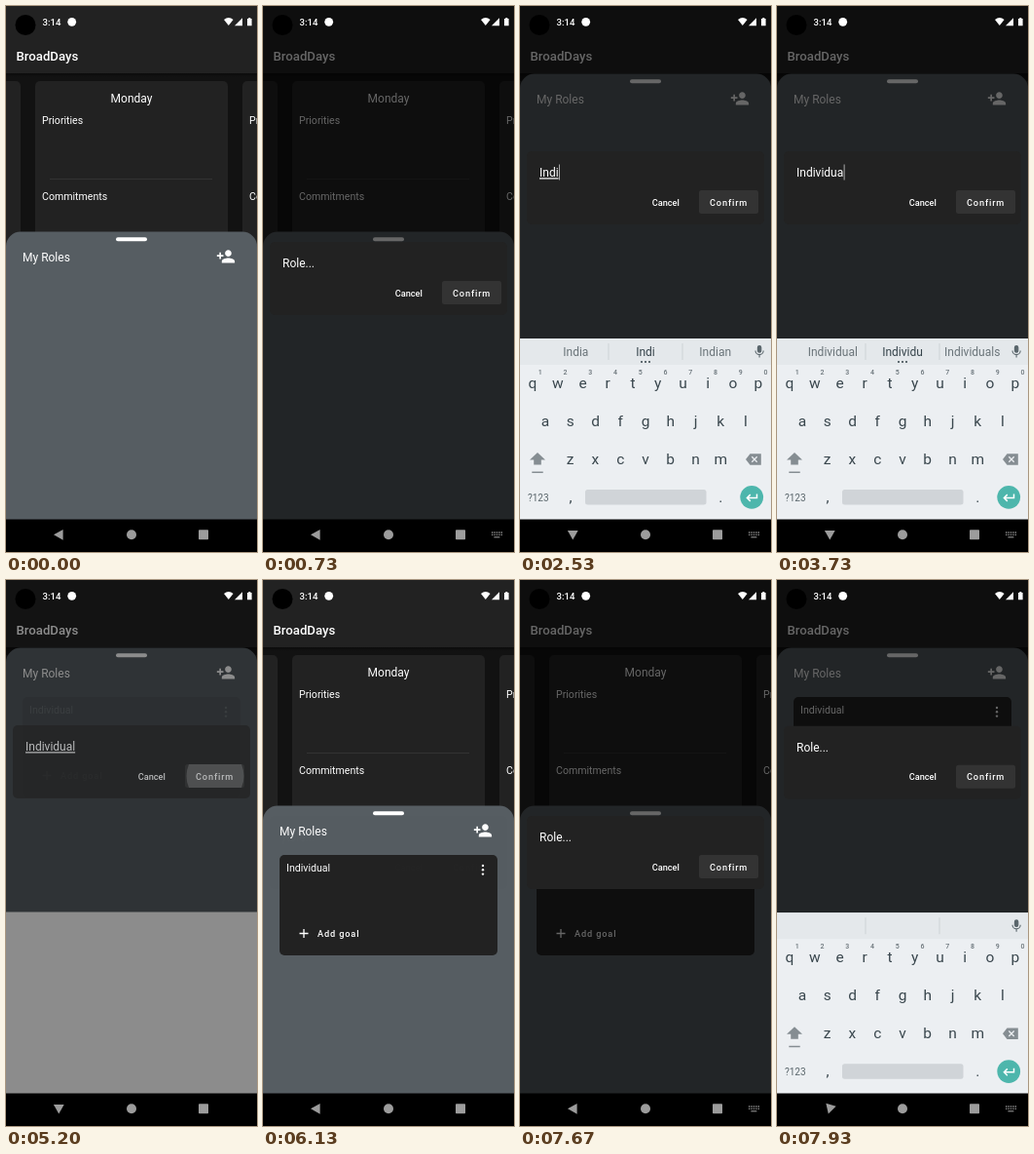
An HTML page for the animation above (8000 ms loop, 258 by 560 pixels).

```html
<!DOCTYPE html>
<html lang="en">
<head>
<meta charset="utf-8">
<title>Weekly planner</title>
<style>
html, body { margin: 0; width: 100%; height: 100%; overflow: hidden; background: #000; }
svg { display: block; width: 100%; height: 100%; }
text { font-family: Roboto, "Noto Sans", sans-serif; fill: #fff; white-space: pre; }
.title { font-size: 13.2px; font-weight: 500; }
.head { font-size: 12px; }
.body { font-size: 10.6px; }
.btn { font-size: 9.2px; font-weight: 500; letter-spacing: .85px; }
.mid { text-anchor: middle; }
.key { font-size: 15.5px; fill: #3a474e; }
.hint { font-size: 7px; font-weight: 500; fill: #687278; }
.sug { font-size: 12px; fill: #6a7479; }
</style>
</head>
<body>
<svg viewBox="0 0 258 560">
  <defs>
    <clipPath id="btnClip"><rect x="184" y="282" width="61" height="24" rx="2.5"/></clipPath>
    <linearGradient id="shade" x2="0" y2="1">
      <stop stop-color="#000" stop-opacity=".35"/><stop offset="1" stop-color="#000" stop-opacity="0"/>
    </linearGradient>
  </defs>

  <rect width="258" height="560" fill="#121212"/>
  <rect width="258" height="69" fill="#222"/>
  <rect y="69" width="258" height="4" fill="url(#shade)"/>
  <text class="title" x="10.5" y="56">BroadDays</text>
  <g fill="#222">
    <rect x="-20" y="77" width="35" height="300" rx="5"/>
    <rect x="30" y="77" width="198" height="300" rx="5"/>
    <rect x="243" y="77" width="40" height="300" rx="5"/>
  </g>
  <text class="head mid" x="129" y="99">Monday</text>
  <text class="body" x="37" y="120.5">Priorities</text>
  <text class="body" x="37" y="198.5">Commitments</text>
  <text class="body" x="250" y="120.5">Priorities</text>
  <text class="body" x="250" y="198.5">Commitments</text>
  <rect x="45" y="177" width="167" height="1" fill="#333"/>

  <g id="sheet">
    <rect y="231.5" width="258" height="520" rx="15" fill="#565d62"/>
    <rect x="113" y="237.2" width="32" height="4" rx="2" fill="#fff"/>
    <text class="head" x="17" y="261.5">My Roles</text>
    <path transform="translate(216 247) scale(.83)" fill="#fff" d="M15 12c2.2 0 4-1.8 4-4s-1.8-4-4-4-4 1.8-4 4 1.8 4 4 4zM6 10V7H4v3H1v2h3v3h2v-3h3v-2zM15 14c-2.7 0-8 1.3-8 4v2h16v-2c0-2.7-5.3-4-8-4z"/>
    <g id="card">
      <rect x="17" y="282" width="224" height="103" rx="5" fill="#222"/>
      <text class="body" x="24" y="299">Individual</text>
      <g fill="#fff">
        <circle cx="226" cy="293" r="1.2"/><circle cx="226" cy="297.3" r="1.2"/><circle cx="226" cy="301.6" r="1.2"/>
      </g>
      <path d="M37.5 362.5h9M42 358v9" stroke="#fff" stroke-width="1.3"/>
      <text class="btn" x="56" y="366">Add goal</text>
    </g>
  </g>
  <rect id="gap" y="340.5" width="258" height="187" fill="#fff"/>
  <rect id="dim" width="258" height="560"/>

  <g id="dialog">
    <rect x="7" y="242" width="244" height="75" rx="5" fill="#222"/>
    <text id="field" class="head" x="20" y="268.3"></text>
    <rect id="caret" y="255.5" width="1" height="16" fill="#aaa"/>
    <text class="btn" x="135.7" y="297.5" style="letter-spacing:0">Cancel</text>
    <rect x="184" y="282" width="61" height="24" rx="2.5" fill="#333"/>
    <circle id="ripple" cx="215" cy="294" fill="#fff" opacity=".22" clip-path="url(#btnClip)"/>
    <text class="btn" x="195" y="297.5">Confirm</text>
  </g>

  <circle cx="20" cy="19.5" r="10.5"/>
  <text x="37.5" y="19.8" style="font-size:9.6px;font-weight:500">3:14</text>
  <g fill="#fff">
    <circle cx="67.7" cy="16.3" r="4.4"/>
    <path d="M224 14q4.8-3.8 9.6 0l-4.8 6zM235 20.2l8-8v8z"/>
    <path d="M248 13h1.3v-1h2v1h1.3v7.3H248z"/>
  </g>

  <g id="keyboard">
    <rect y="341" width="258" height="187" fill="#eceff2"/>
    <rect y="341" width="258" height="27" fill="#e4e8eb"/>
    <path d="M91 346v17M167 346v17" stroke="#cdd2d6"/>
    <g id="sugs">
      <text class="sug mid" x="57.3" y="358.6"></text>
      <text class="sug mid" x="129" y="358.6" style="fill:#36444b"></text>
      <text class="sug mid" x="200.7" y="358.6"></text>
    </g>
    <path id="dots" d="M125 365h.01M129 365h.01M133 365h.01" stroke="#36444b" stroke-width="2" stroke-linecap="round"/>
    <g fill="none" stroke="#59656b" stroke-width="1.1">
      <rect x="244.4" y="348.6" width="3.4" height="6.6" rx="1.7" fill="#59656b"/>
      <path d="M242 353.5a4.1 4.1 0 0 0 8.2 0M246.1 357.6v2.8"/>
    </g>
    <g id="keys"></g>
    <path d="M18 458l8 7.6h-4.2v4.9h-7.6v-4.9H10zM12.3 477.5h11.4v1.5H12.3z" fill="#858d92"/>
    <path d="M236.5 459.3h11.3v11.4h-11.3l-4.5-5.7z" fill="#858d92"/>
    <path d="M238.3 462.3l5.4 5.4m0-5.4l-5.4 5.4" stroke="#eceff2" stroke-width="1.3"/>
    <text x="8" y="507.6" style="font-size:10px;fill:#59656b">?123</text>
    <text class="key mid" x="52" y="508.5">,</text>
    <text class="key mid" x="206.3" y="508.5">.</text>
    <rect x="67" y="496" width="124.5" height="15.5" rx="2.5" fill="#d0d4d8"/>
    <circle cx="238.2" cy="503.8" r="11.9" fill="#4db6ac"/>
    <path d="M243.5 500.5v4h-10m3.3-3.4l-3.4 3.4 3.4 3.4" fill="none" stroke="#fff" stroke-width="1.5"/>
  </g>

  <rect y="526.5" width="258" height="34"/>
  <g fill="#9c9c9c">
    <path id="back" d="M49 542.3l9.6-5.4v10.8z"/>
    <circle cx="129" cy="542.3" r="5"/>
    <rect x="198" y="537.3" width="10" height="10" rx=".8"/>
  </g>
  <g id="imeIcon" stroke="#8c8c8c" fill="none">
    <path d="M235 540h11M235 542.3h11" stroke-width="1.3" stroke-dasharray="1.4 1"/>
    <path d="M237.4 544.8h6" stroke-width="1.2"/>
  </g>
</svg>
<script>
const $ = id => document.getElementById(id);
const LOOP = 8000, FPS = 15;
const WORD = 'Individual';
const KEY_TIMES = [1600, 1800, 2000, 2200, 2667, 3067, 3267, 3467, 3733, 3933];
const GUESSES = [['', ''], ["I'm", "I'll"], ['In', 'Inc'], ['India', 'Indeed'], ['India', 'Indian'],
  ['Individual', 'Individuals']];
const IME_LAG = 120;

// Keyboard letters
const STEP = 25.75;
const label = (cls, x, y, s) => `<text class="${cls} mid" x="${x}" y="${y}">${s}</text>`;
$('keys').innerHTML = [['qwertyuiop', 13], ['asdfghjkl', 26], ['zxcvbnm', 51.7]].map(([row, x0], r) =>
  [...row].map((c, i) => label('key', x0 + i * STEP, 392 + r * 39, c) +
    (r ? '' : label('hint', 20.7 + i * STEP, 378, (i + 1) % 10))).join('')).join('');

const span = (t, a, b) => Math.min(1, Math.max(0, (t - a) / (b - a)));
const out = p => 1 - (1 - p) ** 3;
const show = (id, on) => $(id).setAttribute('visibility', on ? 'visible' : 'hidden');
const shift = (id, y) => $(id).setAttribute('transform', `translate(0 ${y})`);
const alpha = (id, a) => $(id).setAttribute('opacity', a);

function drawField(t, second) {
  const typed = second ? 0 : KEY_TIMES.filter(k => t >= k - 5).length;
  const known = second ? 0 : KEY_TIMES.filter(k => t >= k + IME_LAG).length;
  const field = $('field');
  field.textContent = typed ? WORD.slice(0, typed) : 'Role...';
  field.style.textDecoration = typed && known === typed ? 'underline' : 'none';
  $('caret').setAttribute('x', 20.4 + (typed ? field.getComputedTextLength() : 0));

  const since = typed ? t - KEY_TIMES[typed - 1] + 5 : t - (second ? 6150 : 20);
  show('caret', since % 1000 < 500 && !(t > 5100 && t < 6000));

  const [left, right] = known === WORD.length ? ['Individually', 'Individuals']
    : GUESSES[Math.min(known, GUESSES.length - 1)];
  [left, WORD.slice(0, known), right].forEach((s, i) => $('sugs').children[i].textContent = s);
}

function render(t) {
  const second = t > 6000;
  const open = second ? 6133 : 0;
  const ime = second ? 7667 : 734;
  const closing = !second && t > 5130;

  const fadeIn = span(t, open, open + 133);
  const gone = second ? 0 : span(t, 5133, 5400);
  alpha('dim', .6 * fadeIn * (1 - gone));
  alpha('dialog', fadeIn * (second ? 1 : 1 - span(t, 5133, 5333)));
  shift('dialog', -93 * out(span(t, ime, ime + 330)));

  const raised = t > ime + 30 && (second || t < 5260);
  shift('sheet', raised ? -162 : 0);
  alpha('card', second ? 1 : span(t, 5133, 5400) ** 1.6);

  const hide = second ? 0 : span(t, 4933, 5133);
  const up = t > ime && !closing;
  shift('keyboard', 187 * (1 - out(span(t, ime, ime + 300)) + hide * hide));
  show('keyboard', up);
  show('dots', up && !second && t >= KEY_TIMES[0] + IME_LAG);
  show('gap', !second && t > 4930 && t < 5260);
  show('imeIcon', t >= ime - 5 && !closing);

  const turn = span(t, ime + 66, ime + 312) - (second ? 0 : span(t, 5200, 5400));
  $('back').setAttribute('transform', `rotate(${-90 * turn} 54.3 542.3)`);
  $('ripple').setAttribute('r', second || t < 4660 ? 0 : 10 + 19.5 * out(span(t, 4660, 5000)));
  drawField(t, second);
}

// The picture advances at a fixed rate, like a screen recording
const start = performance.now();
let last = -1;
function frame() {
  const t = (performance.now() - start) % LOOP;
  const tick = Math.floor(t * FPS / 1000 + .06) % (LOOP * FPS / 1000);
  if (tick !== last) render((last = tick) * 1000 / FPS);
  requestAnimationFrame(frame);
}
frame();
</script>
</body>
</html>
```
